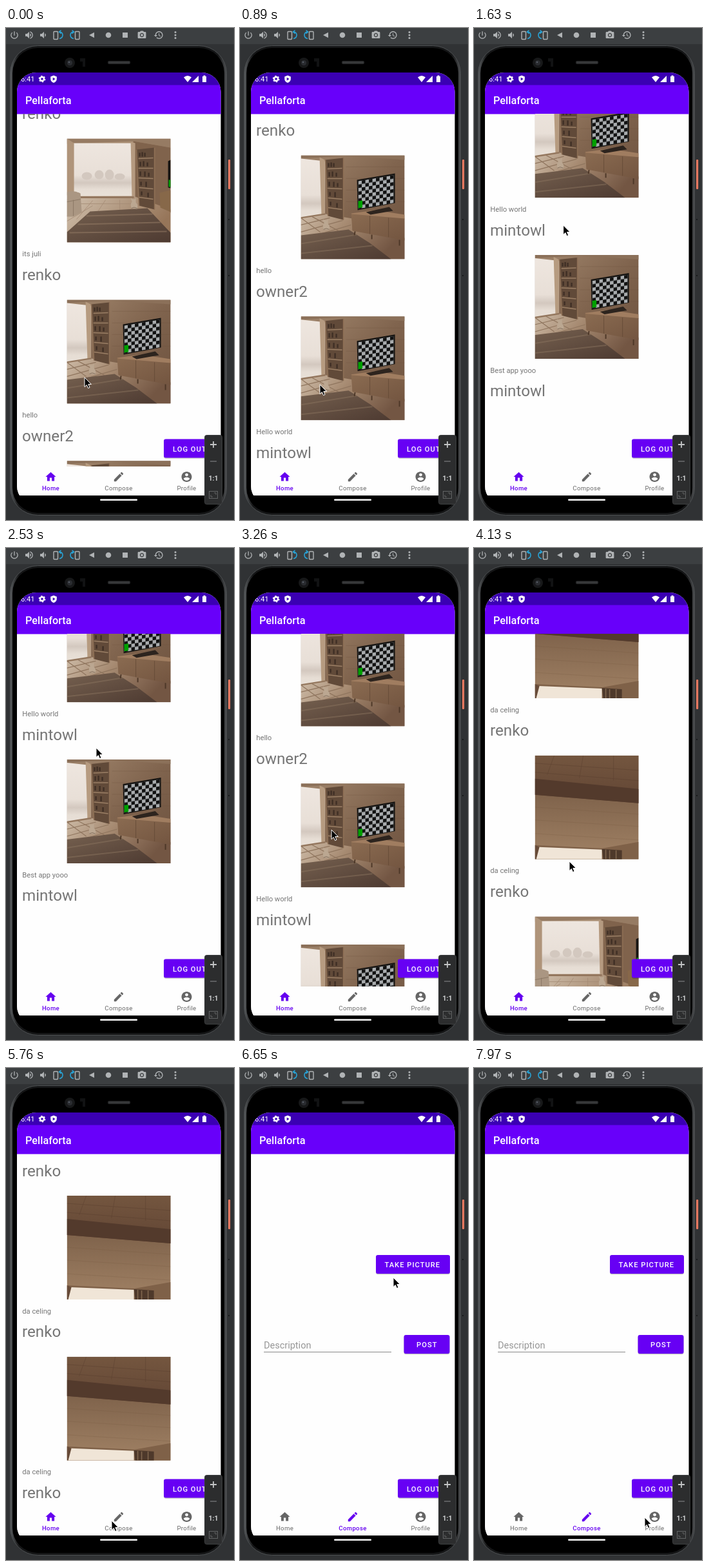
An HTML page that plays this animation: 354 px wide and 763 px high, repeating every 8 s.

```html
<!DOCTYPE html>
<html lang="en">
<head>
<meta charset="utf-8">
<title>Photo feed</title>
<style>
html, body { margin: 0; width: 100%; height: 100%; overflow: hidden; background: #303234; }
svg { display: block; width: 100%; height: 100%; }
text { font-family: Roboto, "Open Sans", sans-serif; }
.name { font-size: 24.2px; fill: #757575; }
.note { font-size: 11.2px; fill: #757575; }
.btn { font-size: 11.2px; font-weight: 500; letter-spacing: 1px; fill: #fff; }
.tab { font-size: 9.6px; letter-spacing: .32px; text-anchor: middle; }
.tab-item { fill: #666; }
.tab-item.on { fill: #6500f0; }
.tab-item.on .tab { font-weight: 500; }
</style>
</head>
<body>
<svg viewBox="0 0 354 763" xmlns="http://www.w3.org/2000/svg">
<defs>
  <linearGradient id="wall" x2="1" y2="1"><stop stop-color="#a1866d"/><stop offset=".5" stop-color="#80644e"/><stop offset="1" stop-color="#6a4f3c"/></linearGradient>
  <linearGradient id="sky" x2="0" y2="1"><stop stop-color="#eee6df"/><stop offset=".6" stop-color="#e8dfd7"/><stop offset=".74" stop-color="#d3c8bf"/><stop offset=".86" stop-color="#e6ddd4"/><stop offset="1" stop-color="#e9e1d8"/></linearGradient>
  <linearGradient id="floor" x2="1" y2=".4"><stop stop-color="#cdbba7"/><stop offset=".45" stop-color="#a68a71"/><stop offset="1" stop-color="#735643"/></linearGradient>
  <linearGradient id="planks" x2="1" y2=".4"><stop stop-color="#d1c1ae"/><stop offset="1" stop-color="#967559"/></linearGradient>
  <linearGradient id="rug" x2="1" y2="1"><stop stop-color="#75604f"/><stop offset="1" stop-color="#4d3a31"/></linearGradient>
  <linearGradient id="front" x2="1" y2="1"><stop stop-color="#8a6b51"/><stop offset="1" stop-color="#735540"/></linearGradient>
  <linearGradient id="roof" x2="0" y2="1"><stop stop-color="#74563f"/><stop offset="1" stop-color="#614534"/></linearGradient>
  <linearGradient id="slope" x2="0" y2="1"><stop offset=".3" stop-color="#7b5f48"/><stop offset="1" stop-color="#a18265"/></linearGradient>
  <linearGradient id="rim" x2="1"><stop stop-color="#575a5c"/><stop offset=".04" stop-color="#151617"/><stop offset=".96" stop-color="#151617"/><stop offset="1" stop-color="#4a4c4e"/></linearGradient>
  <pattern id="check" width="11" height="10.8" patternUnits="userSpaceOnUse">
    <rect width="11" height="10.8" fill="#111"/><path d="M0 0h5.5v5.4H0zM5.5 5.4H11v5.4H5.5z" fill="#a9acae"/>
  </pattern>
  <clipPath id="square"><rect width="161" height="161"/></clipPath>
  <clipPath id="screen"><rect x="17" y="69" width="316.5" height="671" rx="30"/></clipPath>
  <clipPath id="view"><rect x="17" y="133" width="317" height="547"/></clipPath>
  <clipPath id="bar"><rect x="17" y="680" width="317" height="45"/></clipPath>

  <g id="shelf">
    <path d="M0 3 28 0V96L4 90z" fill="#614a39"/>
    <path d="M3 17 26 16M3 32 26 32M3 47 26 48M4 62 26 64M4 77 26 80" stroke="#9b7f65" stroke-width="1.5"/>
    <path d="M5 14V8M9 14V7M13 14V8M6 29v-7M11 29v-8M17 29v-6M6 44v-7M13 45v-8M19 45v-6M7 59v-6M15 61v-8M8 74v-6M18 77v-7" stroke="#3f2f25" stroke-width="2.4"/>
    <path d="M0 3 4 90M28 0V96" stroke="#8d6f55" stroke-width="1.6"/>
  </g>
  <g id="cat">
    <path d="M-4 9q-2-7 1-10l-2-6 3 2h3l2-2v7q4 4 2 10z" fill="#bba791"/>
    <path d="M-4 9q4-3 9 0" stroke="#84705e" fill="none"/>
  </g>

  <g id="tv" clip-path="url(#square)">
    <rect width="161" height="161" fill="url(#wall)"/>
    <path d="M0 0H161V7L68 1 0 5z" fill="#8b7059"/>
    <path d="M70 18H161M70 36H161M70 54H161M70 72H161" stroke="#705541" stroke-width=".6" opacity=".5"/>
    <path d="M0 5 37 9V92L0 99z" fill="url(#sky)"/>
    <path d="M29 3 37 7V95l-5 1z" fill="#b69b80"/>
    <path d="M0 97 38 91 80 98V116L161 128V161H0z" fill="url(#floor)"/>
    <path d="M0 108 45 97M0 119 65 101M20 125 78 108M0 97 30 119M17 95 58 117" stroke="#8f755e" stroke-width="1.2"/>
    <path d="M0 97 38 91" stroke="#94775e" stroke-width="2.4"/>
    <use href="#shelf" x="38" y="4"/>
    <path d="M0 124 74 115 107 136 140 161H0z" fill="url(#rug)"/>
    <path d="M0 137 87 123M0 152 111 140" stroke="#8f7862" stroke-width="2" opacity=".45"/>
    <use href="#cat" x="39" y="106"/>
    <path d="M78 90 115 85 161 92V99L80 93z" fill="#a07d60"/>
    <path d="M78 91 161 98V132L80 117z" fill="url(#front)"/>
    <path d="M107 94V122M136 97V127" stroke="#634936" stroke-width=".8"/>
    <path d="M84 118 83 124M110 123v7M153 131v9" stroke="#4e3828" stroke-width="2"/>
    <path d="M101 88 137 80 143 86 108 92z" fill="#2d241e"/>
    <path d="M87 38 146 28V74L88 85z" fill="#171513"/>
    <g transform="translate(89 40) skewY(-9.5)">
      <rect width="55" height="43" fill="url(#check)"/><rect y="31" width="6.5" height="11" fill="#00a000"/>
    </g>
  </g>

  <g id="window" clip-path="url(#square)">
    <rect width="161" height="161" fill="#a98e74"/>
    <path d="M0 0H161V14L103 4 0 8z" fill="#967b63"/>
    <path d="M103 4 161 14V115H103z" fill="#80634c"/>
    <rect x="10" y="7" width="92" height="83" fill="url(#sky)"/>
    <g fill="#d3c8bf">
      <ellipse cx="31" cy="58" rx="8" ry="6"/><ellipse cx="50" cy="56" rx="7" ry="7"/>
      <ellipse cx="66" cy="56" rx="7" ry="8"/><ellipse cx="82" cy="59" rx="8" ry="5"/>
    </g>
    <path d="M0 0 11 7V91L0 88z" fill="#af947a"/>
    <path d="M99 5 106 7V97l-5-3z" fill="#b59a80"/>
    <path d="M0 94 10 89H103L161 110V161H0z" fill="url(#planks)"/>
    <path d="M20 98 0 120M40 96 15 125M60 95 46 116M82 95V111M0 128 40 104M17 101H122" stroke="#a48b74" stroke-width=".8"/>
    <path d="M10 91H104" stroke="#94775e" stroke-width="3"/>
    <use href="#shelf" x="108" y="14"/>
    <path d="M0 83q10-4 21 2l2 29-13 7H0z" fill="#aa9682"/>
    <path d="M0 98 21 94M10 95v25" stroke="#8c7966"/>
    <path d="M36 113 125 108 161 146V161H0V145z" fill="url(#rug)"/>
    <path d="M30 120 133 117M17 133 145 130M4 146 155 144" stroke="#957d67" stroke-width="2" opacity=".55"/>
    <use href="#cat" x="104" y="99"/>
    <path d="M144 84 161 80V114L145 107z" fill="#876849"/>
    <path d="M157 35 161 33V77l-4-1z" fill="#171513"/>
    <path d="M158 64h3v11h-3z" fill="#00a000"/>
  </g>

  <g id="ceiling" clip-path="url(#square)">
    <rect width="161" height="161" fill="url(#slope)"/>
    <path d="M0 0H161V74L0 61z" fill="url(#roof)"/>
    <path d="M0 12 161 23M0 26 161 39M30 0 19 30M75 0 69 35M122 0V39" stroke="#533a2b" stroke-width=".7" opacity=".5"/>
    <path d="M0 36 161 52V74L0 61z" fill="#533a2c"/>
    <path d="M0 80 161 91M0 100 161 110M0 121 161 131" stroke="#75583f" stroke-width=".6" opacity=".4"/>
    <path d="M0 139 105 144 161 134V161H0z" fill="#7f6148"/>
    <path d="M6 142 104 146V161H0z" fill="#f0e5d7"/>
    <path d="M0 139 7 142 2 161H0z" fill="#674b38"/>
    <path d="M104 145 135 147V161H106z" fill="#4e392b"/>
    <path d="M110 146v15M116 147v14M126 147v14" stroke="#836850" stroke-width="1.5"/>
  </g>
</defs>

<rect width="354" height="763" fill="#303234"/>
<rect width="354" height="25" fill="#3c3f41"/>
<g id="tools" fill="#b0b3b5"></g>

<rect x="345" y="204" width="3.2" height="46" rx="1.2" fill="#e57860"/>
<path d="M346 296v2M346 383v2" stroke="#191a1b" stroke-width="2"/>
<rect x="6.5" y="27.5" width="336" height="728" rx="43" fill="url(#rim)" stroke="#4d5052"/>
<rect x="10" y="31" width="329" height="721" rx="39" fill="#000"/>
<circle cx="99" cy="54" r="8" fill="#171819"/><circle cx="99" cy="54" r="4" fill="#2a2c30"/><circle cx="98" cy="53" r="1.3" fill="#555a64"/>
<path d="M117 47v5M121 47v13" stroke="#111213" stroke-width="4"/>
<rect x="158" y="51" width="35" height="5" rx="2" fill="#292a2b"/>
<path d="M160 53.5H191" stroke="#55575a" stroke-width="1.5" stroke-dasharray="1 1"/>

<g clip-path="url(#screen)">
  <rect x="17" y="69" width="317" height="656" fill="#fefefe"/>
  <rect x="17" y="725" width="317" height="20" fill="#000"/>
  <rect x="17" y="69" width="317" height="20" fill="#3b00b3"/>
  <rect x="17" y="88.5" width="317" height="45" fill="#6800fa"/>
  <text x="23" y="83" font-size="11.2" fill="#fff">6:41</text>
  <circle cx="56" cy="79" r="3" fill="none" stroke="#fff" stroke-width="2.4"/>
  <circle cx="56" cy="79" r="4.6" fill="none" stroke="#fff" stroke-width="1.5" stroke-dasharray="2.4 2.4"/>
  <path d="M74 73.5 78.8 75.5V79q0 4-4.8 6-4.8-2-4.8-6V75.5z" fill="#fff"/>
  <path d="M72.7 76.8 76.6 79 72.7 81.4z" fill="#3b00b3"/>
  <path d="M282 84 276 76.5q6-5 12 0zM299 74V84H289zM305 75h1.5v-1.4h3V75H311V84H305z" fill="#fff"/>
  <text x="30" y="117.5" font-size="16.3" font-weight="500" fill="#fff">Pellaforta</text>
  <g clip-path="url(#view)">
    <g id="feed"></g>
    <g id="compose">
      <text x="37" y="434.5" font-size="14.5" fill="#969696">Description</text>
      <path d="M37 440.5H235" stroke="#8a8a8a"/>
    </g>
    <g id="logout"></g>
  </g>
  <g clip-path="url(#bar)">
    <rect x="17" y="680" width="317" height="45" fill="#fefefe"/>
    <circle id="ripple" cx="175" cy="702" r="56" fill="#6500f0" opacity="0"/>
    <g id="tabs"></g>
  </g>
</g>
<rect x="146" y="730.5" width="58" height="2.4" rx="1.2" fill="#f4f4f4"/>

<rect x="308.5" y="631.5" width="27" height="107" rx="3" fill="#2c2d2e" stroke="#3d3f40"/>
<path d="M317 646H327M322 641V651" stroke="#c3c5c6" stroke-width="1.8"/>
<path d="M317 672H327" stroke="#6b6d6e" stroke-width="1.5"/>
<text x="322" y="702" font-size="10.5" font-weight="700" fill="#d0d2d3" text-anchor="middle">1:1</text>
<g fill="none" stroke="#626465"><rect x="315.5" y="718.5" width="13" height="11"/><path d="M318 724v3h3M326 724v-3h-3"/></g>

<path id="cursor" d="M0 0V14.6L3.3 11.5 5.5 16.6 8 15.5 5.8 10.5H10.4z" fill="#000" stroke="#fff" stroke-width="1"/>
</svg>

<script>
const $ = id => document.getElementById(id);
const add = (id, markup) => $(id).insertAdjacentHTML('beforeend', markup);
// 24-unit icon centred on x, y
const icon = (d, x, y, s) =>
  `<path transform="translate(${x - 12 * s} ${y - 12 * s}) scale(${s})" d="${d}"/>`;

const speaker = 'M3 9v6h4l5 5V4L7 9H3zm13.5 3c0-1.77-1.02-3.29-2.5-4.03v8.05c1.48-.73 2.5-2.25 2.5-4.02z';
const icons = {
  power: 'M13 3h-2v10h2V3zm4.83 2.17l-1.42 1.42C17.99 7.86 19 9.81 19 12c0 3.87-3.13 7-7 7s-7-3.13-7-7c0-2.19 1.01-4.14 2.58-5.42L6.17 5.17C4.23 6.82 3 9.26 3 12c0 4.97 4.03 9 9 9s9-4.03 9-9c0-2.74-1.23-5.18-3.17-6.83z',
  loud: speaker + 'M14 3.23v2.06c2.89.86 5 3.54 5 6.71s-2.11 5.85-5 6.71v2.06c4.01-.91 7-4.49 7-8.77s-2.99-7.86-7-8.77z',
  camera: 'M9 2L7.17 4H4c-1.1 0-2 .9-2 2v12c0 1.1.9 2 2 2h16c1.1 0 2-.9 2-2V6c0-1.1-.9-2-2-2h-3.17L15 2H9zm3 15c-2.76 0-5-2.24-5-5s2.24-5 5-5 5 2.24 5 5-2.24 5-5 5zm0-8a3 3 0 1 0 0 6 3 3 0 0 0 0-6z',
  history: 'M13 3c-4.97 0-9 4.03-9 9H1l3.89 3.89.07.14L9 12H6c0-3.87 3.13-7 7-7s7 3.13 7 7-3.13 7-7 7c-1.93 0-3.68-.79-4.94-2.06l-1.42 1.42C8.27 19.99 10.51 21 13 21c4.97 0 9-4.03 9-9s-4.03-9-9-9zm-1 5v5l4.28 2.54.72-1.21-3.5-2.08V8H12z',
  home: 'M10 20v-6h4v6h5v-8h3L12 3 2 12h3v8z',
  edit: 'M3 17.25V21h3.75L17.81 9.94l-3.75-3.75L3 17.25zM20.71 7.04c.39-.39.39-1.02 0-1.41l-2.34-2.34c-.39-.39-1.02-.39-1.41 0l-1.83 1.83 3.75 3.75 1.83-1.83z',
  user: 'M12 2C6.48 2 2 6.48 2 12s4.48 10 10 10 10-4.48 10-10S17.52 2 12 2zm0 3c1.66 0 3 1.34 3 3s-1.34 3-3 3-3-1.34-3-3 1.34-3 3-3zm0 14.2c-2.5 0-4.71-1.28-6-3.22.03-1.99 4-3.08 6-3.08 1.99 0 5.97 1.09 6 3.08-1.29 1.94-3.5 3.22-6 3.22z'
};

const turn = `<rect x="-7" y="-5.5" width="6.5" height="12" rx="1" fill="none" stroke="#b0b3b5" stroke-width="1.4"/>
  <path d="M2 5.5q5-1 5-5.5t-5-5M4.5-7.5 1.5-5l3 2.6" fill="none" stroke="#28a3d6" stroke-width="1.6"/>`;
add('tools', icon(icons.power, 13, 11, .64) + icon(icons.loud, 36, 11, .66) + icon(speaker, 59, 11, .66)
  + `<g transform="translate(81 11)">${turn}</g><g transform="translate(107 11) scale(-1 1)">${turn}</g>`
  + '<path d="M129 11 137 6.8V15.2zM181 7h8v8h-8z"/><circle cx="159" cy="11" r="4.3"/>'
  + icon(icons.camera, 211, 11, .64) + icon(icons.history, 237, 11, .66)
  + [6.5, 11, 15.5].map(y => `<circle cx="263" cy="${y}" r="1.5"/>`).join(''));

const posts = [
  ['renko', 'ceiling', 'da celing'],
  ['renko', 'ceiling', 'da celing'],
  ['renko', 'window', 'its juli'],
  ['renko', 'tv', 'hello'],
  ['owner2', 'tv', 'Hello world'],
  ['mintowl', 'tv', 'Best app yooo'],
  ['mintowl', '', '']
];
posts.forEach(([name, scene, note], i) => add('feed',
  `<g transform="translate(0 ${198 + i * 249.8})"><text class="name" x="25" y="-30.5">${name}</text>`
  + (scene && `<use href="#${scene}" x="94.6"/>`)
  + `<text class="note" x="25.3" y="182.5">${note}</text></g>`));

const button = (x, y, w, label, tx) =>
  `<rect x="${x}" y="${y + 1.2}" width="${w}" height="29" rx="3" fill="#000" opacity=".22"/>
   <rect x="${x}" y="${y}" width="${w}" height="29" rx="3" fill="#6700f4"/>
   <text class="btn" x="${tx}" y="${y + 19}">${label}</text>`;
add('compose', button(211, 290, 115, 'TAKE PICTURE', 224.5) + button(254.5, 414, 71, 'POST', 274));
add('logout', button(245, 637.6, 81, 'LOG OUT', 259));

[['Home', 'home', 69.5], ['Compose', 'edit', 175], ['Profile', 'user', 280.5]].forEach(([label, d, x]) =>
  add('tabs', `<g class="tab-item">${icon(icons[d], x, 696, .8)}<text class="tab" x="${x}" y="717">${label}</text></g>`));
const tabs = $('tabs').children;

// Keys: step, value
const STEP = 147.6, LEAD = 8, LOOP = 8000, SWITCH = 40;
const scroll = [[0, 526], [1, 540], [2, 620], [3, 690], [4, 728], [6, 750], [7, 762], [9, 950], [10, 1040],
  [11, 1095], [13, 1119], [17, 1119], [18, 1100], [19, 1040], [22, 832], [24, 720], [25, 620],
  [27, 260], [28, 126], [29, 50], [30, 10], [31, 0]];
const pointer = [[0, 122, 542], [1, 122, 535], [3, 130, 360], [4, 130, 390], [6, 124, 553], [7, 124, 545],
  [9, 134, 350], [10, 138, 305], [13, 140, 308], [17, 140, 310], [18, 140, 330], [20, 142, 425],
  [22, 142, 437], [24, 143, 320], [26, 146, 430], [28, 148, 486], [31, 148, 492], [34, 152, 570],
  [39, 164, 702], [41, 166, 701], [42, 178, 640], [44, 228, 380], [45, 238, 325], [46, 238, 325],
  [48, 248, 480], [49, 250, 600], [50, 244, 682], [51, 244, 682], [54, 265, 697]];

function at(keys, step, col) {
  const i = keys.findIndex(k => k[0] >= step);
  if (i < 0) return keys[keys.length - 1][col];
  if (!i) return keys[0][col];
  const a = keys[i - 1], b = keys[i];
  return a[col] + (b[col] - a[col]) * (step - a[0]) / (b[0] - a[0]);
}

function draw(now) {
  const step = Math.floor((now % LOOP + LEAD) / STEP);
  const composing = step >= SWITCH;
  $('feed').style.display = composing ? 'none' : '';
  $('compose').style.display = composing ? '' : 'none';
  $('feed').setAttribute('transform', `translate(0 ${-at(scroll, step, 1)})`);
  $('cursor').setAttribute('transform', `translate(${at(pointer, step, 1)} ${at(pointer, step, 2)})`);
  tabs[0].classList.toggle('on', !composing);
  tabs[1].classList.toggle('on', composing);
  $('ripple').setAttribute('opacity', composing ? Math.max(0, .12 - .06 * (step - SWITCH)) : 0);
}

const start = performance.now();
function tick() {
  draw(performance.now() - start);
  requestAnimationFrame(tick);
}
tick();
</script>
</body>
</html>
```
